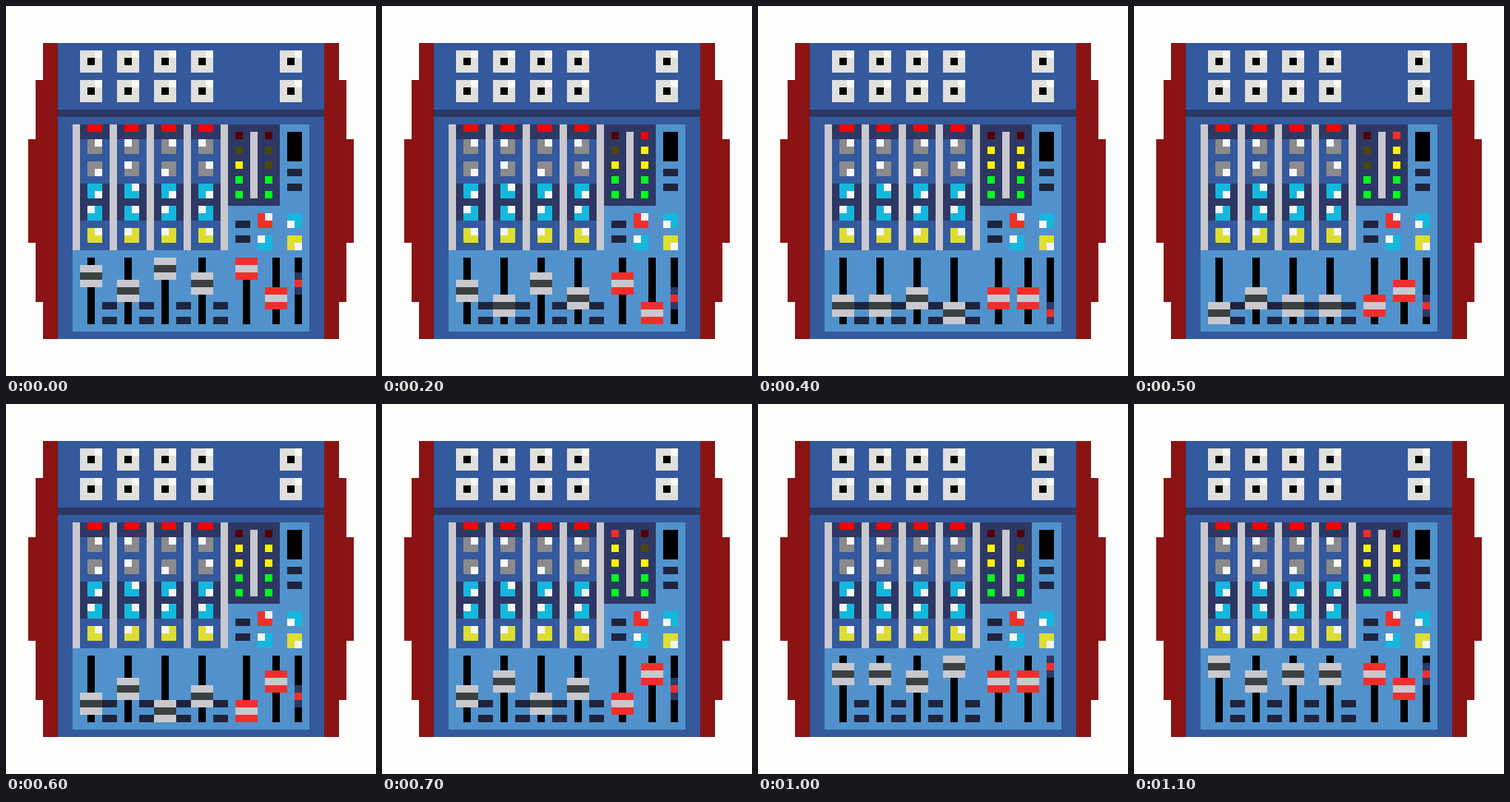
Recreate the animation shown at these times as an HTML page with a canvas. Size 500 px wide and 500 px high, loop 1.2 s.

```html
<!DOCTYPE html>
<html lang="en">
<head>
<meta charset="utf-8">
<title>Mixing desk</title>
<style>
  html, body { margin: 0; width: 100%; height: 100%; overflow: hidden; background: #fdfefc; }
  canvas { display: block; width: 500px; height: 500px; }
</style>
</head>
<body>
<canvas id="stage" width="500" height="500"></canvas>
<script>
const ctx = document.getElementById('stage').getContext('2d');
ctx.scale(10, 10); // one unit is one art pixel

const STEP = 100, STEPS = 12;
const C = {
  paper: '#fdfefc', wood: '#8a1414', body: '#34599c', panel: '#5192cd', navy: '#2d3865',
  dash: '#1f243d', metal: '#c8c8ce', grip: '#3a4140', black: '#000', white: '#f6f6f4',
  jack: '#e0e0dc', grey: '#8b8b8d', cyan: '#14b8de', yellow: '#dede32', red: '#f02f2c', hot: '#ff0000'
};
const CORNER = { a: [0, 0], b: [1, 0], c: [0, 1], d: [1, 1] };
const KNOB_ROWS = [[18, C.grey], [21, C.grey], [24, C.cyan], [27, C.cyan], [30, C.yellow]];
const KNOB_TURNS = ['bddab', 'aabba', 'bcdaa', 'abdab'];

// Faders: left edge, phase in steps, cap and grip colours
const FADERS = [
  [10, 1, C.metal, C.grip], [15, 3, C.metal, C.grip], [20, 0, C.metal, C.grip],
  [25, 2, C.metal, C.grip], [31, 0, C.red, C.metal], [35, 4, C.red, C.metal]
];
const LEVELS = [[31, '343542453245'], [35, '245345432134']];
const LAMPS = [['#ff0000', '#500008'], ['#fff200', '#4a480c'], ['#fff200', '#4a480c'],
               ['#00ff1e', '#063c14'], ['#00ff1e', '#063c14']];

function box(color, x, y, w = 1, h = 1) {
  ctx.fillStyle = color;
  ctx.fillRect(x, y, w, h);
}

function knob(color, x, y, corner) {
  const [dx, dy] = CORNER[corner];
  box(color, x, y, 2, 2);
  box(C.white, x + dx, y + dy);
}

// Up-and-down travel of six units per loop
const travel = n => 6 - Math.abs(6 - n % STEPS);

function drawCase() {
  box(C.paper, 0, 0, 50, 50);
  box(C.wood, 5, 5, 40, 40);
  box(C.wood, 4, 10, 42, 30);
  box(C.wood, 3, 18, 44, 14);
  box(C.body, 7, 5, 36, 40);
  box(C.navy, 7, 14, 36, 1);
  box(C.panel, 9, 16, 32, 28);
  for (const x of [10, 15, 20, 25, 37]) {
    for (const y of [6, 10]) {
      box(C.jack, x, y, 3, 3);
      box('#f8f8f6', x + 2, y);
      box(C.black, x + 1, y + 1);
    }
  }
}

function drawChannels() {
  KNOB_TURNS.forEach((turns, i) => {
    const x = 10 + i * 5;
    box(C.body, x, 16, 4, 17);
    box(C.navy, x, 16, 4, 2);
    box(C.navy, x, 24, 4, 5);
    box(C.hot, x + 1, 16, 2, 1);
    KNOB_ROWS.forEach(([y, color], k) => knob(color, x + 1, y, turns[k]));
  });
  for (let x = 9; x <= 29; x += 5) box(C.metal, x, 16, 1, 17);
}

function drawMaster(step) {
  box(C.navy, 30, 16, 7, 11);
  box(C.metal, 33, 17, 1, 9);
  for (const [x, levels] of LEVELS) {
    LAMPS.forEach(([on, off], i) => {
      const lit = 5 - i <= +levels[step];
      const glow = i === 0 && step > 3 ? C.red : on;
      box(lit ? glow : off, x, 17 + i * 2);
    });
  }
  box(C.black, 38, 17, 2, 4);
  for (const [x, y] of [[38, 22], [38, 24], [31, 29], [31, 31]]) box(C.dash, x, y, 2, 1);
  knob(C.red, 34, 28, 'b');
  knob(C.cyan, 34, 31, 'a');
  knob(C.cyan, 38, 28, 'c');
  knob(C.yellow, 38, 31, 'd');
}

function drawFaders(step) {
  for (let x = 13; x <= 28; x += 5) {
    box(C.dash, x, 40, 2, 1);
    box(C.dash, x, 42, 2, 1);
  }
  for (const [x, phase, cap, grip] of FADERS) {
    const y = 34 + travel(step + phase);
    box(C.black, x + 1, 34, 1, 9);
    box(cap, x, y, 3, 3);
    box(grip, x, y + 1, 3, 1);
  }
  const y = 34 + travel(step + 2);
  box(C.black, 39, 34, 1, 9);
  box(C.navy, 39, y, 1, 3);
  box(C.red, 39, y + 1);
}

function draw(step) {
  drawCase();
  drawChannels();
  drawMaster(step);
  drawFaders(step);
}

const start = performance.now();
function tick() {
  draw(Math.floor((performance.now() - start) / STEP) % STEPS);
  requestAnimationFrame(tick);
}
tick();
</script>
</body>
</html>
```
